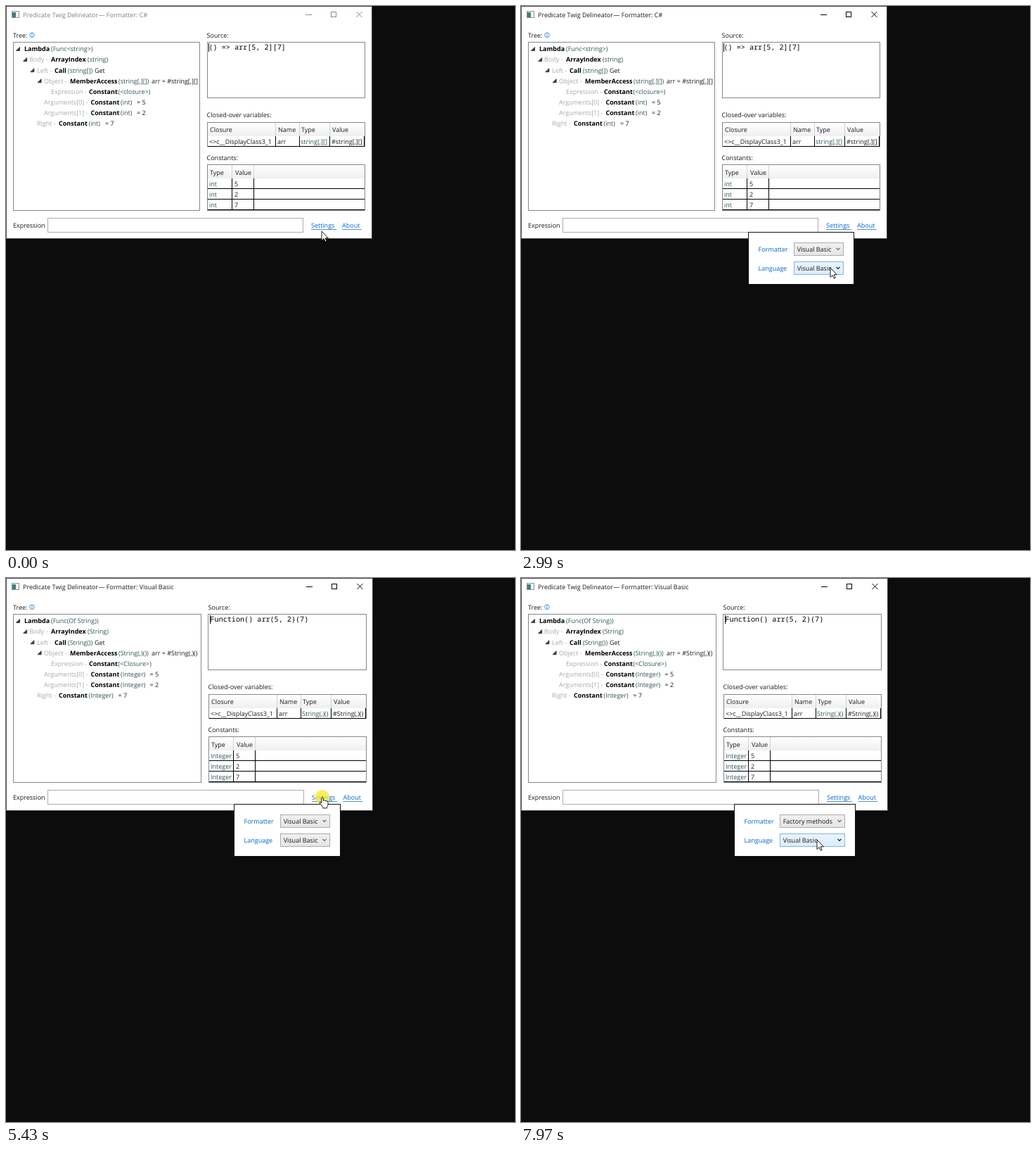
Write an HTML page that moves like this. It is 724x773 px and loops after 8 s.

```html
<!DOCTYPE html>
<html lang="en">
<head>
<meta charset="utf-8">
<title>Predicate Twig Delineator</title>
<style>
  html, body { margin: 0; width: 100%; height: 100%; overflow: hidden; background: #0c0c0c; }
  svg { display: block; }
  text { font: 9px "Open Sans", "Noto Sans", sans-serif; fill: #1a1a1a; white-space: pre; text-rendering: geometricPrecision; }
  .b { font-weight: 700; fill: #000; }
  .dim { fill: #a9a9a9; }
  .type { fill: #2b5555; }
  .link { fill: #0066cc; }
  .code { font: 10.15px "Noto Sans Mono", "DejaVu Sans Mono", monospace; fill: #000; }
</style>
</head>
<body>
<svg id="stage" width="724" height="773" viewBox="0 0 724 773">
  <defs>
    <linearGradient id="head" x2="0" y2="1"><stop stop-color="#fff"/><stop offset="1" stop-color="#efeff1"/></linearGradient>
    <linearGradient id="combo" x2="0" y2="1"><stop stop-color="#f0f0f0"/><stop offset="1" stop-color="#e5e5e5"/></linearGradient>
    <linearGradient id="hover" x2="0" y2="1"><stop stop-color="#ecf4fc"/><stop offset="1" stop-color="#dcecfc"/></linearGradient>
  </defs>
  <g id="scene"></g>
</svg>
<script>
const LOOP = 8000, STEP = 79;
const FORMATS = ['C#', 'Visual Basic', 'Factory methods', 'Object notation', 'Textual tree'];

// Cursor moves: start, number of steps, end point
const MOVES = [
  [80, 2, 451, 311], [860, 2, 431, 343], [1180, 1, 433, 343], [1890, 4, 438, 369],
  [2290, 2, 440, 372], [3240, 7, 432, 100], [4410, 3, 447, 241], [4640, 8, 450, 311],
  [5740, 3, 441, 334], [6150, 1, 438, 338], [6540, 7, 421, 380], [7110, 1, 420, 389],
  [7190, 2, 419, 392], [7670, 4, 421, 372]
];
const CLICKS = [[390, 550], [1420, 1580], [2610, 2760], [3710, 3870], [5270, 5500], [6300, 6460], [7430, 7510]];

const LANGS = {
  cs: { name: 'C#', str: 'string', int: 'int', func: 'Func<string>', ix: '[,][]', one: '[]', closure: '<closure>',
        code: '() => arr[5, 2][7]', gap: 5 },
  vb: { name: 'Visual Basic', str: 'String', int: 'Integer', func: 'Func(Of String)', ix: '(,)()', one: '()', closure: '<Closure>',
        code: 'Function() arr(5, 2)(7)', gap: 23.5 }
};

const within = (t, a, b) => t >= a && t < b;
const esc = s => s.replace(/&/g, '&amp;').replace(/</g, '&lt;');
const text = (x, y, s, cls = '') => `<text x="${x}" y="${y}" class="${cls}">${esc(s)}</text>`;
const fill = (x, y, w, h, c, o = 1) => `<rect x="${x}" y="${y}" width="${w}" height="${h}" fill="${c}" opacity="${o}"/>`;
const box = (x, y, w, h, stroke, c = '#fff') =>
  `<rect x="${x + .5}" y="${y + .5}" width="${w - 1}" height="${h - 1}" fill="${c}" stroke="${stroke}"/>`;
const path = (d, stroke, c = 'none', extra = '') => `<path d="${d}" stroke="${stroke}" fill="${c}" ${extra}/>`;
const hline = (x, y, w, c = '#000') => fill(x, y, w, 1, c);
const vline = (x, y, h, c = '#000') => fill(x, y, 1, h, c);

function cursorAt(t) {
  let x = 449, y = 320;
  for (const [start, n, ex, ey] of MOVES) {
    if (t < start) break;
    const k = Math.min(n, Math.floor((t - start) / STEP) + 1) / n;
    x += (ex - x) * k;
    y += (ey - y) * k;
  }
  return { x, y };
}

function titleBar(lang, d, active) {
  const ink = active ? '#000' : '#8a8a8a';
  return box(8, 7, 11, 10, '#8a9499', '#f4f6f6') + fill(9, 9, 5, 7, '#3f7f80') +
    `<g style="opacity:${active ? 1 : .55}">` +
    text(24, 15.5, 'Predicate Twig Delineator') + text(131.5, 15.5, '— Formatter: ' + lang.name) + '</g>' +
    hline(426 + d, 12, 9, ink) + box(462 + d, 8, 8, 8, ink) +
    path(`M${498.5 + d} 8l8 8m0-8l-8 8`, ink);
}

function tree(lang, picked) {
  const type = s => `(${s})`;
  const rows = [
    [26, '', 26, 'Lambda', 64, lang.func],
    [33, 'Body -', 64, 'ArrayIndex', 116, lang.str],
    [44, 'Left -', 69, 'Call', 88, lang.str + lang.one, 126, 'Get'],
    [54, 'Object -', 91, 'MemberAccess', 160, lang.str + lang.ix, 207, 'arr = #' + lang.str + lang.ix],
    [64, 'Expression -', 118, 'Constant', 159.5, lang.closure],
    [54, 'Arguments[0] -', 120.5, 'Constant', 163, lang.int, 181 + lang.gap, '= 5'],
    [54, 'Arguments[1] -', 120.5, 'Constant', 163, lang.int, 181 + lang.gap, '= 2'],
    [44, 'Right -', 75, 'Constant', 117.5, lang.int, 136 + lang.gap, '= 7']
  ];
  let out = picked ? fill(32, 69, 116, 15, '#f0f0f0') : '';
  rows.forEach(([px, prefix, bx, bold, tx, kind, rx, rest], i) => {
    const y = 64.3 + i * 15.1;
    if (i < 4) out += path(`M${14.5 + i * 10.2} ${y - .8}h5v-5z`, '#262626', '#404040', 'stroke-width=".8"');
    out += text(px, y, prefix, 'dim') + text(bx, y, bold, 'b') + text(tx, y, type(kind), 'type');
    if (rest) out += text(rx, y, rest);
  });
  return out;
}

function closures(lang, x) {
  const name = lang.str + lang.ix, cols = [97, 131, 174];
  let out = box(x, 165, 225, 35, '#828790') + fill(x + 1, 166, 223, 19, 'url(#head)');
  for (const c of cols) out += vline(x + c, 166, 19, '#d0d2d6') + vline(x + c, 185, 14);
  return out + vline(x + 223, 185, 14) + hline(x + 1, 199, 223) +
    text(x + 4, 179, 'Closure') + text(x + 101, 179, 'Name') + text(x + 134, 179, 'Type') + text(x + 178, 179, 'Value') +
    text(x + 3, 195.5, '<>c__DisplayClass3_1') + text(x + 100, 195.5, 'arr') +
    text(x + 133, 195.5, name, 'type') + text(x + 177, 195.5, '#' + name);
}

function constants(lang, x) {
  let out = box(x, 225, 225, 66, '#828790') + fill(x + 1, 226, 223, 19, 'url(#head)') +
    text(x + 4, 239.5, 'Type') + text(x + 40, 239.5, 'Value');
  for (const c of [35, 66]) out += vline(x + c, 226, 19, '#d0d2d6') + vline(x + c, 245, 45);
  ['5', '2', '7'].forEach((v, i) => {
    const y = 256 + i * 15.2;
    out += text(x + 3, y, lang.int, 'type') + text(x + 39, y, v) + hline(x + 1, Math.round(y + 3), 223);
  });
  return out;
}

function mainWindow(t) {
  const vb = t >= 4105, lang = vb ? LANGS.vb : LANGS.cs, d = vb ? 1 : 0, x = 286 + 2 * d;
  const focused = within(t, 3790, 5350), caret = !within(t, 4720, 5250);
  const link = (lx, w, s) => text(lx, 315, s, 'link') + hline(lx, 317, w, '#4a94d8');
  return box(0, 0, 521 + d, 331, '#4a4a4a') + titleBar(lang, d, t >= 390) +
    text(10, 44.5, 'Tree:') + '<circle cx="37" cy="41.3" r="3.3" fill="#fff" stroke="#2b88d8" stroke-width=".9"/>' +
    fill(36.5, 40.6, 1, 2.8, '#2b88d8') + fill(36.5, 38.9, 1, 1, '#2b88d8') +
    box(10, 51, 266 + 2 * d, 240, '#828790') + tree(lang, within(t, 3790, 4105)) +
    text(x - .5, 44.5, 'Source:') + box(x - d, 51, 225 + d, 80, focused ? '#569de5' : '#828790') +
    text(x + 2.5, 62.3, lang.code, 'code') + (caret ? vline(x + 2, 53, 12) : '') +
    text(x - .5, 158, 'Closed-over variables:') + closures(lang, x) +
    text(x - .5, 218.5, 'Constants:') + constants(lang, x) +
    text(10, 315, 'Expression') + box(59, 301, 364 + d, 21, '#abadb3') +
    link(434 + d, 36, 'Settings') + link(478 + 1.5 * d, 28, 'About');
}

function combo(x, y, w, label, p) {
  const hot = within(p.x, x, x + w) && within(p.y, y, y + 18), a = x + w - 8;
  return box(x, y, w, 19, hot ? '#7eb4ea' : '#acacac', hot ? 'url(#hover)' : 'url(#combo)') +
    text(x + 4.7, y + 13, label) +
    path(`M${a - 2.5} ${y + 7.8}l2.5 2.5 2.5-2.5`, hot ? '#111' : '#606060', 'none', 'stroke-width="1.2"');
}

function dropDown(x, h, selected, p) {
  const over = h === 80 ? Math.floor((p.y - 355) / 16) : -1;
  let rows = box(x, 354, 79, 81, '#707070');
  FORMATS.forEach((name, i) => {
    const y = 355 + i * 16;
    if (i === over) rows += box(x + 1, y, 77, 16, '#26a0da', '#bde3f5');
    else if (i === selected) rows += fill(x + 1, y, 77, 16, '#f3f3f3');
    rows += text(x + 4.7, y + 11.3, name);
  });
  return fill(x + 4, 354, 77, h + 2, '#000', .25) + fill(x + 4, 354, 76, h + 1, '#000', .4) +
    `<svg x="${x}" y="354" width="79" height="${h + 1}" viewBox="${x} ${434 - h} 79 ${h + 1}">${rows}</svg>` +
    hline(x, 354, 79, '#707070');
}

function popup(t, p) {
  const late = t >= 5350;
  if (!within(t, 470, 3790) && !late) return '';
  const format = t >= 7670 ? 2 : t >= 2990 ? 1 : 0, speech = t >= 2990 ? 1 : 0;
  const left = late ? [0, 324, 303][format] : [359, 323][format], right = late ? 475 : 473;
  const cx = left + 66 - (format ? 1 : 0) + (late && format === 1 ? 1 : 0), cw = right - 14 - cx;
  let out = box(left, 321, right - left + 1, 75, '#111') + fill(left + 1, 322, right - left - 1, 73, '#fff') +
    text(left + 14.5, 349, 'Formatter', 'link') + text(left + 14.5, 376, 'Language', 'link') +
    combo(cx, 336, cw, FORMATS[format], p) + combo(cx, 363, cw, FORMATS[speech], p);
  for (const [a, b] of [[1500, 2990], [6380, 7670]])
    if (within(t, a, b)) out += dropDown(cx, t < a + 80 ? 14 : 80, format, p);
  return out;
}

function pointer(t, { x, y }) {
  const at = (s, inner) => `<g transform="translate(${x} ${y}) scale(${s})">${inner}</g>`;
  let out = CLICKS.some(([a, b]) => within(t, a, b)) ? `<circle cx="${x}" cy="${y}" r="10" fill="#f8ea30" opacity=".8"/>` : '';
  if (y < 130) return out + at(1, path('M-2.5-6.5h2l.5.5.5-.5h2M0-6V6M-2.5 6.5h2l.5-.5.5.5h2', '#000'));
  if (within(y, 305, 317))
    return out + at(.8, path('M-1.5 1.5q1.5-2 3 0v5q2-1 3 .5 2-1 3 .5 2-.5 2.5 1.5v4q0 3-2 5v2h-7v-2l-5-6q-2-3 0-3.500l2.500 2.500z', '#000', '#fff', 'stroke-width="1.1"'));
  return out + at(.82, path('M0 0V16.500l3.800-3.600 2.600 5.600 2.300-1-2.500-5.500h5.200z', '#000', '#fff', 'stroke-width="1.1"'));
}

const scene = document.getElementById('scene');
let shown = '';
function draw(now) {
  const t = now % LOOP, p = cursorAt(t);
  const next = mainWindow(t) + popup(t, p) + pointer(t, p);
  if (next !== shown) scene.innerHTML = shown = next;
}
const begin = performance.now();
function tick() {
  draw(performance.now() - begin);
  requestAnimationFrame(tick);
}
tick();
</script>
</body>
</html>
```
